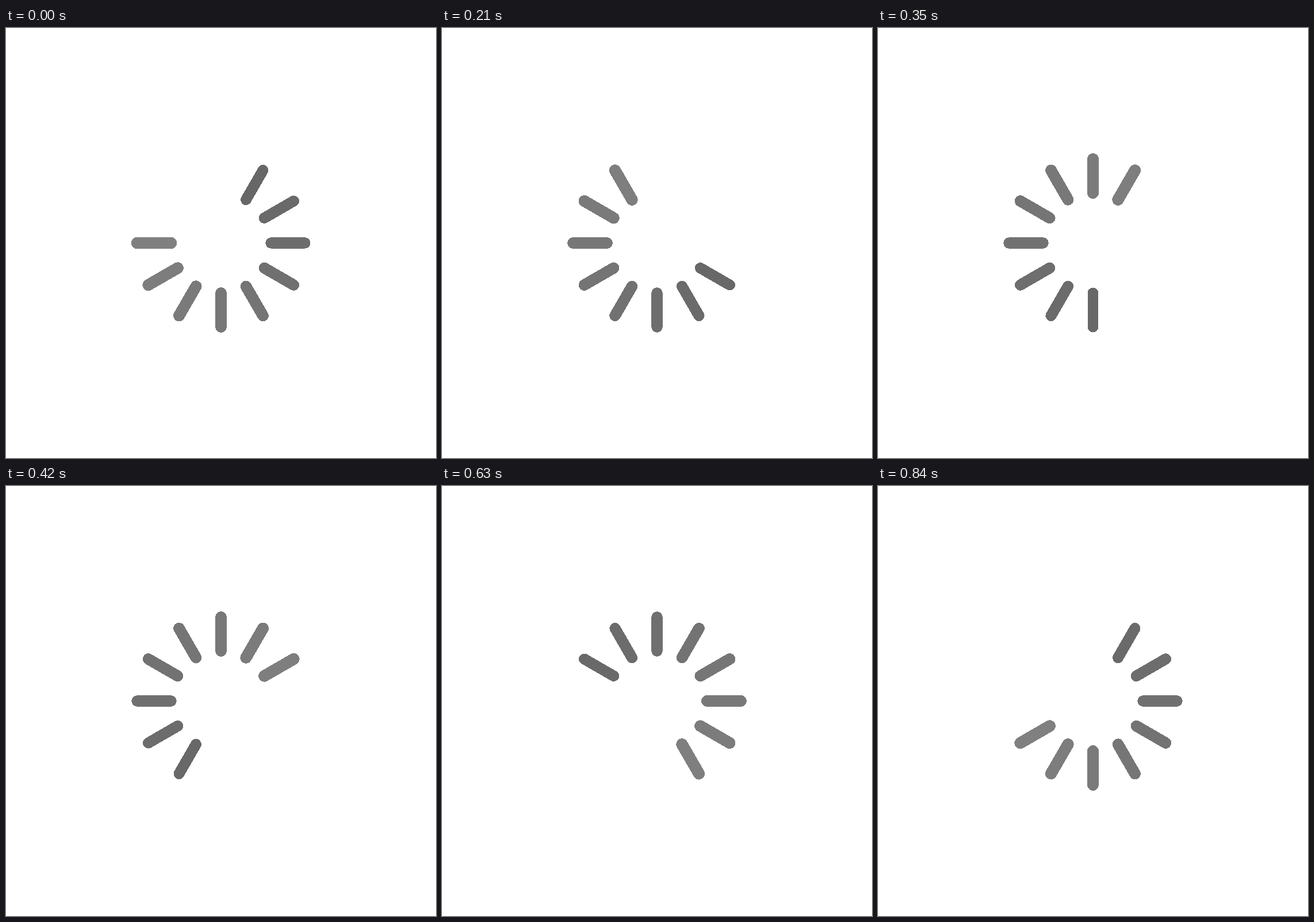
These frames come from a looping animation (748 by 748 pixels, 0.91 s). An HTML page:

```html
<!DOCTYPE html>
<html lang="en">
<head>
<meta charset="utf-8">
<title>Spinner</title>
<style>
  html, body { margin: 0; width: 100%; height: 100%; overflow: hidden; background: #fff; }
  svg { display: block; width: 100vw; height: 100vh; }
  line { stroke-linecap: round; shape-rendering: crispEdges; }
</style>
</head>
<body>
<svg viewBox="0 0 748 748"><g id="spokes" transform="translate(374 374)"></g></svg>
<script>
  const SPOKES = 12, FRAMES = 13, HOLD = 70, LIFE = 8, FIRST = 9;
  const group = document.getElementById('spokes');

  const spokes = Array.from({ length: SPOKES }, (_, i) => {
    const line = document.createElementNS('http://www.w3.org/2000/svg', 'line');
    line.setAttribute('y1', -87);
    line.setAttribute('y2', -146);
    line.setAttribute('transform', `rotate(${i * 360 / SPOKES})`);
    return group.appendChild(line);
  });

  const mix = (a, b, k) => a + (b - a) * k;

  // Each spoke appears light, darkens and thins a little, then vanishes.
  function draw(time) {
    const frame = Math.floor(time / HOLD) % FRAMES;
    const head = FIRST + frame * SPOKES / FRAMES;
    spokes.forEach((line, i) => {
      const age = (head - i + SPOKES) % SPOKES;
      const k = age / LIFE;
      const grey = Math.round(mix(128, 103, k));
      line.style.visibility = k <= 1 ? 'visible' : 'hidden';
      line.style.stroke = `rgb(${grey}, ${grey}, ${grey})`;
      line.style.strokeWidth = mix(20.4, 18.8, k);
    });
  }

  function tick() {
    draw(performance.now());
    requestAnimationFrame(tick);
  }
  tick();
</script>
</body>
</html>
```
